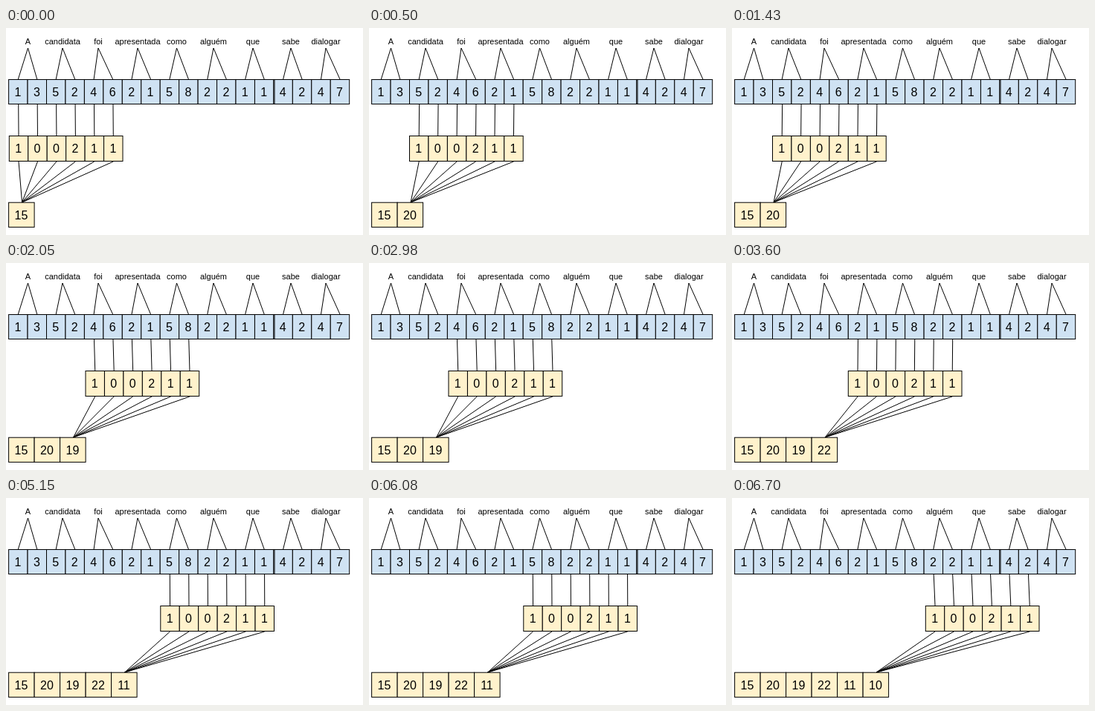
An HTML page for the animation above (8000 ms loop, 480x279 px).

```html
<!DOCTYPE html>
<html lang="pt">
<head>
<meta charset="utf-8">
<title>Convolução de texto</title>
<style>
  html, body { margin: 0; width: 100%; height: 100%; overflow: hidden; background: #fff; }
  svg { display: block; width: 480px; height: 279px; }
  text { font: 16px "Liberation Sans", Arial, sans-serif; text-anchor: middle; fill: #000; }
  .word { font-size: 11px; }
  rect, line { stroke: #000; stroke-width: 1; }
  .input { fill: #cfe2f3; }
  .warm { fill: #fff2cc; }
</style>
</head>
<body>
<svg viewBox="0 0 480 279">
  <g id="sentence"></g>
  <g id="window"></g>
</svg>
<script>
const LOOP = 8000;
const STARTS = [0, 500, 2050, 3600, 5150, 6700];
const WORDS = [
  ["A", 29.5], ["candidata", 76], ["foi", 124], ["apresentada", 177], ["como", 229.5],
  ["alguém", 279], ["que", 332], ["sabe", 383], ["dialogar", 430]
];
const INPUT = [1, 3, 5, 2, 4, 6, 2, 1, 5, 8, 2, 2, 1, 1, 4, 2, 4, 7];
const KERNEL = [1, 0, 0, 2, 1, 1];
const KERNEL_X = [4.3, 54.5, 107, 156.3, 207.8, 260.3];
const RESULT = [15, 20, 19, 22, 11, 10];
const LEFT = 3.6, CELL = 25.45, OUT = 34.5;

const inputX = i => LEFT + CELL * (i + 0.5);

const line = (x1, y1, x2, y2) =>
  `<line x1="${x1}" y1="${y1}" x2="${x2}" y2="${y2}"/>`;

const label = (x, y, value, name = "") =>
  `<text class="${name}" x="${x}" y="${y}">${value}</text>`;

function row(values, x, y, w, h, name) {
  return values.map((value, i) =>
    `<rect class="${name}" x="${x + i * w}" y="${y}" width="${w}" height="${h}"/>` +
    label(x + (i + 0.5) * w - 0.4, y + 22.6, value)
  ).join("");
}

function drawSentence() {
  const words = WORDS.map(([word, x], i) =>
    label(x, 22, word, "word") +
    line(x, 27, inputX(2 * i), 69) +
    line(x, 27, inputX(2 * i + 1), 69));
  return words.join("") + row(INPUT, LEFT, 69.5, CELL, 33, "input") +
    line(361, 69, 361, 103);
}

function drawWindow(step) {
  const x = KERNEL_X[step];
  const apex = LEFT + OUT * (step + 0.5) + 0.7;
  const links = KERNEL.map((_, i) => {
    const mid = x + CELL * (i + 0.5);
    return line(inputX(2 * step + i) + 0.4, 103, mid, 145) + line(mid, 180, apex, 235);
  });
  return links.join("") +
    row(KERNEL, x, 145.5, CELL, 34, "warm") +
    row(RESULT.slice(0, step + 1), LEFT, 235.2, OUT, 33.2, "warm");
}

const windowGroup = document.getElementById("window");
document.getElementById("sentence").innerHTML = drawSentence();

let shown = -1;
function render(now) {
  const t = now % LOOP;
  const step = STARTS.filter(start => start <= t).length - 1;
  if (step !== shown) {
    windowGroup.innerHTML = drawWindow(step);
    shown = step;
  }
}

const origin = performance.now();
function tick() {
  render(performance.now() - origin);
  requestAnimationFrame(tick);
}
tick();
</script>
</body>
</html>
```
